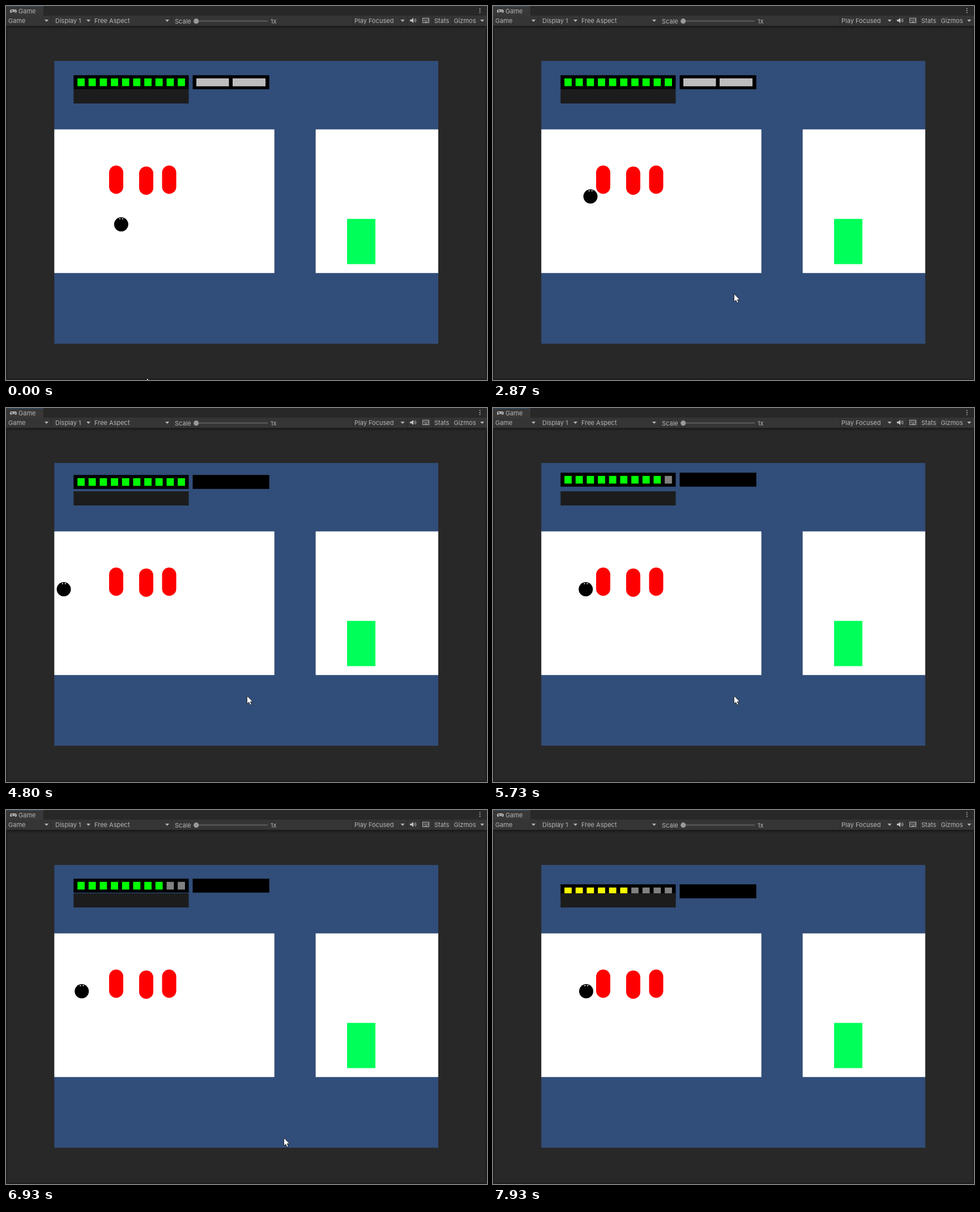
Write an HTML page that moves like this. It is 849 by 660 pixels and loops after 8 s.

```html
<!DOCTYPE html>
<html lang="en">
<head>
<meta charset="utf-8">
<title>Game view</title>
<style>
  html, body { margin: 0; width: 100%; height: 100%; overflow: hidden; background: #282828; }
  svg { display: block; width: 849px; height: 660px; }
  text { font: 11px Inter, sans-serif; fill: #b4b4b4; }
</style>
</head>
<body>
<svg viewBox="0 0 849 660">
  <defs>
    <linearGradient id="down" x2="0" y2="1"><stop stop-color="#181818"/><stop offset="1" stop-color="#282828"/></linearGradient>
    <linearGradient id="right"><stop stop-color="#1b1b1b"/><stop offset="1" stop-color="#282828"/></linearGradient>
    <linearGradient id="left"><stop stop-color="#282828"/><stop offset="1" stop-color="#1b1b1b"/></linearGradient>
    <linearGradient id="up" x2="0" y2="1"><stop stop-color="#282828"/><stop offset="1" stop-color="#1b1b1b"/></linearGradient>
    <path id="arrow" d="M0 0h7l-3.5 4z" fill="#b4b4b4"/>
    <rect id="enemy" width="25" height="50" rx="12.5" fill="#f00"/>
  </defs>
  <rect width="849" height="660" fill="#282828"/>

  <!-- tab row and toolbar -->
  <rect width="66" height="17" fill="#383838"/>
  <rect width="66" height="1" fill="#2c4f6e"/>
  <rect y="17" width="849" height="18" fill="#353535"/>
  <g fill="#b4b4b4">
    <path d="M10 6h6q3 0 3 3.5q0 2.500-2 2.500l-2-1.500h-4l-2 1.500q-2 0-2-2.500q0-3.500 3-3.500z"/>
    <path d="M9 8.500h3M10.500 7v3" stroke="#383838"/>
    <circle cx="15" cy="7.900" r=".7" fill="#383838"/><circle cx="16.500" cy="9.300" r=".7" fill="#383838"/>
    <circle cx="836.500" cy="4.500" r="1"/><circle cx="836.500" cy="8" r="1"/><circle cx="836.500" cy="11.500" r="1"/>
  </g>
  <g id="labels"></g>
  <path d="M79.500 17v18M152.500 17v18M292.500 17v18M612.500 17v18M708.500 17v18M731.500 17v18M752.500 17v18M787.500 17v18" stroke="#2a2a2a"/>
  <path d="M336 26.500H462" stroke="#5e5e5e" stroke-width="2"/>
  <circle cx="335.700" cy="26.700" r="4.600" fill="#999"/>
  <path d="M713 24h2.500l3.500-3v9l-3.500-3H713z" fill="#c4c4c4"/>
  <path d="M720.500 23.500q1.500 2 0 4M722.500 22q2.500 3.500 0 7" fill="none" stroke="#c4c4c4"/>
  <rect x="735.500" y="21.500" width="11" height="8" fill="none" stroke="#b4b4b4"/>
  <path d="M737 24h9M737 26h9" stroke="#b4b4b4" stroke-dasharray="1.500 1"/>
  <path d="M739 28h5" stroke="#b4b4b4"/>

  <!-- shaded edge of the view -->
  <rect y="35" width="849" height="6" fill="url(#down)"/>
  <rect y="38" width="4" height="622" fill="url(#right)"/>
  <rect x="845" y="38" width="4" height="622" fill="url(#left)"/>
  <rect y="656" width="849" height="4" fill="url(#up)"/>

  <!-- game -->
  <rect x="85.300" y="97" width="677.700" height="499" fill="#314d79"/>
  <g id="hud">
    <rect x="119.300" y="122.200" width="203.200" height="24.600"/>
    <rect x="329.500" y="122.200" width="135.200" height="24.600"/>
    <g id="cells"></g>
    <g id="shields" fill="#bdbdbd">
      <rect x="336" y="127.700" width="57.500" height="14"/>
      <rect x="400" y="127.700" width="58" height="14"/>
    </g>
  </g>
  <rect x="119.300" y="147" width="203.200" height="25" fill="#1c1c1c"/>
  <path d="M85.300 217.700H473.700V471.300H85.300zM546.600 217.700H763V471.300H546.600z" fill="#fff"/>
  <rect x="602" y="375.700" width="50" height="79.800" fill="#00ff59"/>
  <use href="#enemy" x="182" y="281.500"/>
  <use href="#enemy" x="235" y="283.200"/>
  <use href="#enemy" x="275.500" y="281.500"/>
  <g id="ball">
    <circle r="12.500"/>
    <path d="M-3.300-10.800h2v2h-2zM1.700-10.800h2v2h-2z" fill="#d8d8d8"/>
  </g>
  <path id="cursor" d="M.5.5V14.500L3.700 11.500L6 16.500L8.300 15.500L6.200 10.700H10.500z" fill="#fff" stroke="#111" stroke-width=".8"/>
</svg>
<script>
const LOOP = 8000, STEP = 1000 / 15;
const NS = 'http://www.w3.org/2000/svg';
const $ = id => document.getElementById(id);

function add(parent, tag, attrs, text = '') {
  const el = document.createElementNS(NS, tag);
  for (const k in attrs) el.setAttribute(k, attrs[k]);
  el.textContent = text;
  return parent.appendChild(el);
}

[['Game', 22, 13], ['Game', 4, 30], ['Display 1', 87, 30], ['Free Aspect', 156, 30], ['Scale', 298, 30.5],
 ['1x', 467, 30.5], ['Play Focused', 615, 30], ['Stats', 756, 30], ['Gizmos', 790.5, 30]]
  .forEach(([s, x, y]) => add($('labels'), 'text', { x, y }, s));
[68, 142, 281, 696.5, 837].forEach(x => add($('labels'), 'use', { href: '#arrow', x, y: 24 }));

const cells = Array.from({ length: 10 }, (_, i) =>
  add($('cells'), 'rect', { x: 126.1 + i * 19.67, y: 127.8, width: 12.8, height: 13.6 }));
const shields = [...$('shields').children];

const clamp = u => Math.min(1, Math.max(0, u));
const easeOut = u => 1 - (1 - clamp(u)) ** 2;
const mix = (a, b, u) => a + (b - a) * u;

// Visits points [seconds, x, y] along straight lines
function along(path, s) {
  let [, x, y] = path[0];
  for (let i = 1; i < path.length; i++) {
    const u = clamp((s - path[i - 1][0]) / (path[i][0] - path[i - 1][0]));
    x = mix(x, path[i][1], u);
    y = mix(y, path[i][2], u);
  }
  return [x, y];
}

// Each touch knocks the ball back; it then walks up to the enemy again
const TOUCH_X = 168.5, WALK = 141;
const hits = [
  { at: 3.09, kick: 42.5, back: 4.2 },
  { at: 4.424, kick: 66.5, back: 5.69 },
  { at: 5.7195, kick: 44.5, back: 6.55 },
  { at: 6.566, kick: 43.5, back: 7.18 },
  { at: 7.29, kick: 36.5, back: 7.8 },
  { at: 7.827, kick: 6, back: 8.1 }
];
const approach = [[1.82, 203.3, 385.3], [1.95, 217, 385.3], [2.44, 172, 385.3], [2.867, 172, 336]];

function ballAt(s, hit) {
  if (!hit) return along(approach, s);
  const away = TOUCH_X - hit.kick * easeOut((s - hit.at) / .25);
  const walk = TOUCH_X - WALK * Math.max(0, hit.back - s);
  return [Math.max(away, walk), mix(336, 319.8, easeOut((s - hits[0].at) / .8))];
}

// The pointer dips in, circles once, then slides between resting places
const dip = [[0, 248, 656], [.1, 340, 626], [.2, 430, 670]];
const slide = [[1.54, 460, 638], [1.667, 458, 624], [1.95, 458, 624], [2.6, 425, 507.5],
  [6.73, 425, 507.5], [6.933, 490, 578], [7.133, 510, 670]];

function cursorAt(s) {
  if (s < .7) return along(dip, s);
  if (s > 1.47) return along(slide, s);
  const a = Math.PI * mix(1 / 2, 7 / 3, (s - .7) / .767);
  return [377 + 168 * Math.cos(a), 510 + 148 * Math.sin(a)];
}

const shake = s => hits.reduce((sum, { at }) => {
  const d = Math.max(0, s - at);
  return sum - 18.5 * clamp(1 - d / .75) * Math.sin(34.5 * d);
}, 0);

const move = (id, [x, y]) => $(id).setAttribute('transform', `translate(${x} ${y})`);

function draw(ms) {
  const s = Math.floor((ms + 3.4) / STEP) * STEP / 1000;
  const taken = hits.filter(h => h.at <= s).length;
  const health = 10 - Math.max(0, taken - shields.length);
  const full = health > 6 ? '#0f0' : '#f5fa00';
  cells.forEach((c, i) => c.setAttribute('fill', i < health ? full : '#808080'));
  shields.forEach((b, i) => b.setAttribute('opacity', i < shields.length - taken ? 1 : 0));
  move('hud', [0, Math.round(shake(s))]);
  move('ball', ballAt(s, hits[taken - 1]));
  move('cursor', cursorAt(s));
}

const start = performance.now();
function tick() {
  draw((performance.now() - start) % LOOP);
  requestAnimationFrame(tick);
}
draw(0);
requestAnimationFrame(tick);
</script>
</body>
</html>
```
